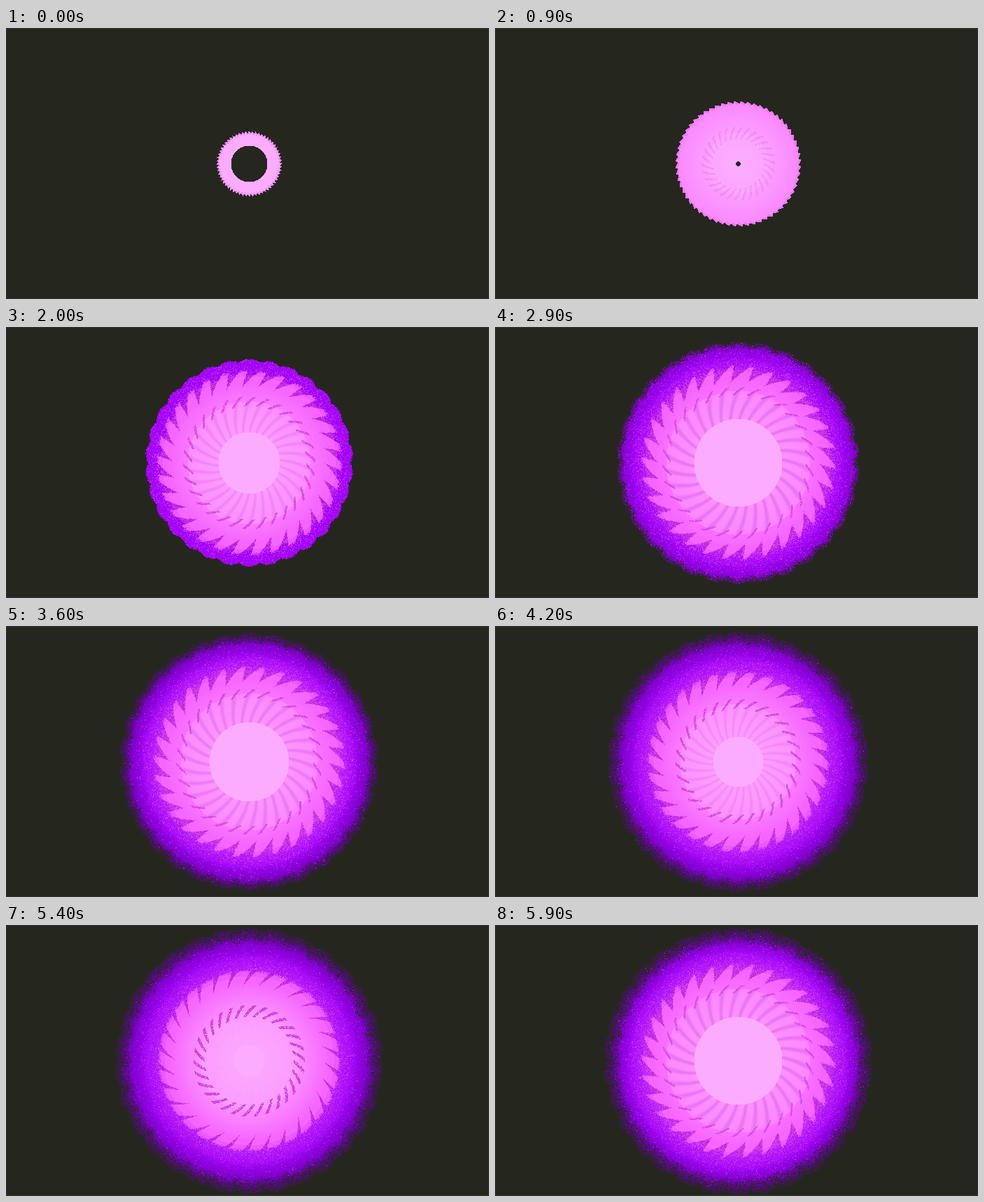
Recreate the animation shown at these times as an HTML page with a canvas. Size 690 by 388 pixels, loop 6000 ms.

```html
<!DOCTYPE html>
<html lang="en">
<head>
<meta charset="utf-8">
<title>Particle bloom</title>
<style>
  html, body { margin: 0; width: 100%; height: 100%; overflow: hidden; background: #25271f; }
  canvas { display: block; width: 690px; height: 388px; }
</style>
</head>
<body>
<canvas id="stage" width="690" height="388"></canvas>
<script>
const W = 690, H = 388, CX = 347, CY = 194, SIZE = 394, HALF = SIZE / 2;
const LOOP = 6000, STEP = 100, BURST = 0.75, ARMS = 30, TAU = Math.PI * 2;

const ctx = document.getElementById('stage').getContext('2d');
const image = ctx.createImageData(SIZE, H);
const px = image.data;

// Key lists: time, value, time, value, ...
const EDGE = [0, 47, 0.3, 70, 0.7, 88.5, 0.9, 90, 1.4, 118, 2, 149, 2.8, 172, 3.5, 185, 4.2, 187, 4.8, 190, 5.9, 192];
const HOLE = [0, 26, 0.9, 3.2, 1, 0];
const FUZZ = [1, 0, 2, 2, 2.9, 10, 4.2, 20, 6, 24];
const CORE = [0, 12, 0.15, 22, 0.3, 30, 0.45, 36, 0.5, 44, 0.65, 63, 0.75, 66];
const SPECKS = [0, 68, 0.3, 75, 0.45, 83, 0.5, 88, 0.65, 103, 0.75, 106];
const TEETH = [0, 127, 0.15, 121, 0.3, 119, 0.45, 121, 0.5, 124, 0.65, 131, 0.75, 132];

const BG = [37, 39, 31];
const PALE = [252, 172, 255];
const ROSE = [253, 134, 255];
const PINK = [246, 102, 255];
const SPOKE = [226, 104, 238];
const SPECK = [196, 44, 216];
const VIOLET = [166, 4, 255];
const LILAC = [196, 48, 255];
const DUSK = [112, 2, 182];
const NIGHT = [62, 16, 84];

const clamp = v => Math.max(0, Math.min(1, v));
const lerp = (a, b, k) => a + (b - a) * k;
const frac = v => v - Math.floor(v);

function keyed(list, t) {
  if (t <= list[0]) return list[1];
  for (let i = 2; i < list.length; i += 2) {
    if (t <= list[i]) return lerp(list[i - 1], list[i + 1], (t - list[i - 2]) / (list[i] - list[i - 2]));
  }
  return list[list.length - 1];
}

// Distance from the nearest curved arm, 0 on it and 0.5 midway to the next
const armGap = (a, dr, twist) => Math.abs(frac((a - dr * twist) * ARMS / TAU) - 0.5);

// Static polar field and grain
const count = SIZE * H;
const radius = new Float32Array(count), angle = new Float32Array(count), grain = new Float32Array(count);
let seed = 7;
for (let i = 0; i < count; i++) {
  const x = i % SIZE - HALF, y = Math.floor(i / SIZE) - CY;
  radius[i] = Math.hypot(x, y);
  angle[i] = Math.atan2(y, x) + Math.PI;
  seed = (Math.imul(seed, 1664525) + 1013904223) >>> 0;
  grain[i] = seed / 4294967296;
}

const out = [0, 0, 0];
function set(c) { out[0] = c[0]; out[1] = c[1]; out[2] = c[2]; }
function mix(c, k) { for (let j = 0; j < 3; j++) out[j] += (c[j] - out[j]) * k; }

function drawBloom(t, step) {
  const u = t % BURST, phase = clamp(u / 0.65);
  const edge = keyed(EDGE, t), hole = keyed(HOLE, t), fuzz = keyed(FUZZ, t);
  const grow = lerp(0.62, 1, clamp((t - 0.9) / 1.1));
  const core = t < BURST ? edge : keyed(CORE, u) * grow;
  const speck = t < BURST ? edge : keyed(SPECKS, u) * grow;
  const teeth = lerp(edge + 22, keyed(TEETH, u), clamp((t - 0.9) / 1.1));
  const speckPower = clamp((t - 0.6) / 1.4) * lerp(0.85, 0.55, phase);
  const speckWidth = lerp(0.19, 0.1, phase), speckReach = lerp(9, 6, phase);
  const toothWidth = lerp(0.14, 0.42, phase * phase);
  const early = t < 1.2 ? 0.45 : 1;
  const late = clamp((t - 2) / 1.6);
  const offset = step * 7919;

  for (let i = 0; i < count; i++) {
    const r = radius[i], a = angle[i];
    const n = grain[(i + offset) % count], m = grain[(i * 3 + offset) % count];
    let rim = edge;
    if (t < 1.3) rim -= 3.5 * frac(a * 60 / TAU - r * 0.06);
    else rim -= 4 * (1 - Math.abs(Math.sin(a * ARMS / 2)));
    const fade = fuzz ? clamp((r - rim + fuzz) / fuzz) : 0;

    if (r > rim || r < hole || n < fade * 0.68) {
      set(BG);
    } else {
      const notch = 22 * clamp(1 - armGap(a, r - teeth, 0.006) / toothWidth);
      const border = teeth + 7 - notch + (m - 0.5) * 5;

      if (r > border) {
        const q = clamp((r - teeth) / Math.max(8, edge - teeth));
        set(VIOLET);
        mix(LILAC, 0.7 * late * clamp(1 - q * 2));
        mix(DUSK, late * clamp(q * 2 - 0.7));
        mix(NIGHT, late * fade * 0.75);
        if (r < teeth + 2) mix(SPECK, 0.6);
        if (m < 0.4 * Math.exp(-Math.max(0, r - teeth) / 12)) mix(PINK, 0.55);
        const light = 0.9 + 0.16 * n;
        out[0] *= light; out[1] *= light; out[2] *= light;
      } else {
        set(PALE);
        if (r > core) {
          const zone = clamp((r - core) / Math.max(1, speck - core));
          mix(ROSE, early * clamp(0.1 + 0.6 * phase * phase + 0.3 * zone));
          if (r < speck && t > 1.2) {
            const gap = armGap(a, r - speck, 0.0045);
            mix(SPOKE, clamp(1 - gap / 0.27) * 0.75 * phase * phase);
          }
        }
        if (r > speck) mix(PINK, early * clamp(0.1 + 0.55 * phase + (r - speck) / 55));
        if (r > teeth) mix(LILAC, 0.1 + 0.2 * m);
        if (Math.abs(r - speck) < speckReach && armGap(a, r - speck, 0.012) < speckWidth && n < 0.85) {
          mix(SPECK, speckPower);
        }
        if (t < 1.3 && r > rim - 2.5) mix(SPOKE, 0.5);
      }
    }
    const k = i * 4;
    px[k] = out[0]; px[k + 1] = out[1]; px[k + 2] = out[2]; px[k + 3] = 255;
  }
}

function render(step) {
  ctx.fillStyle = '#25271f';
  ctx.fillRect(0, 0, W, H);
  drawBloom(step * STEP / 1000, step);
  ctx.putImageData(image, CX - HALF, 0);
  ctx.strokeStyle = '#30332f';
  ctx.strokeRect(0.5, 0.5, W - 1, H - 1);
}

let start = null, shown = -1;
function tick(now) {
  if (start === null) start = now;
  const step = Math.floor(((now - start) % LOOP) / STEP);
  if (step !== shown) {
    shown = step;
    render(step);
  }
  requestAnimationFrame(tick);
}
render(0);
requestAnimationFrame(tick);
</script>
</body>
</html>
```
